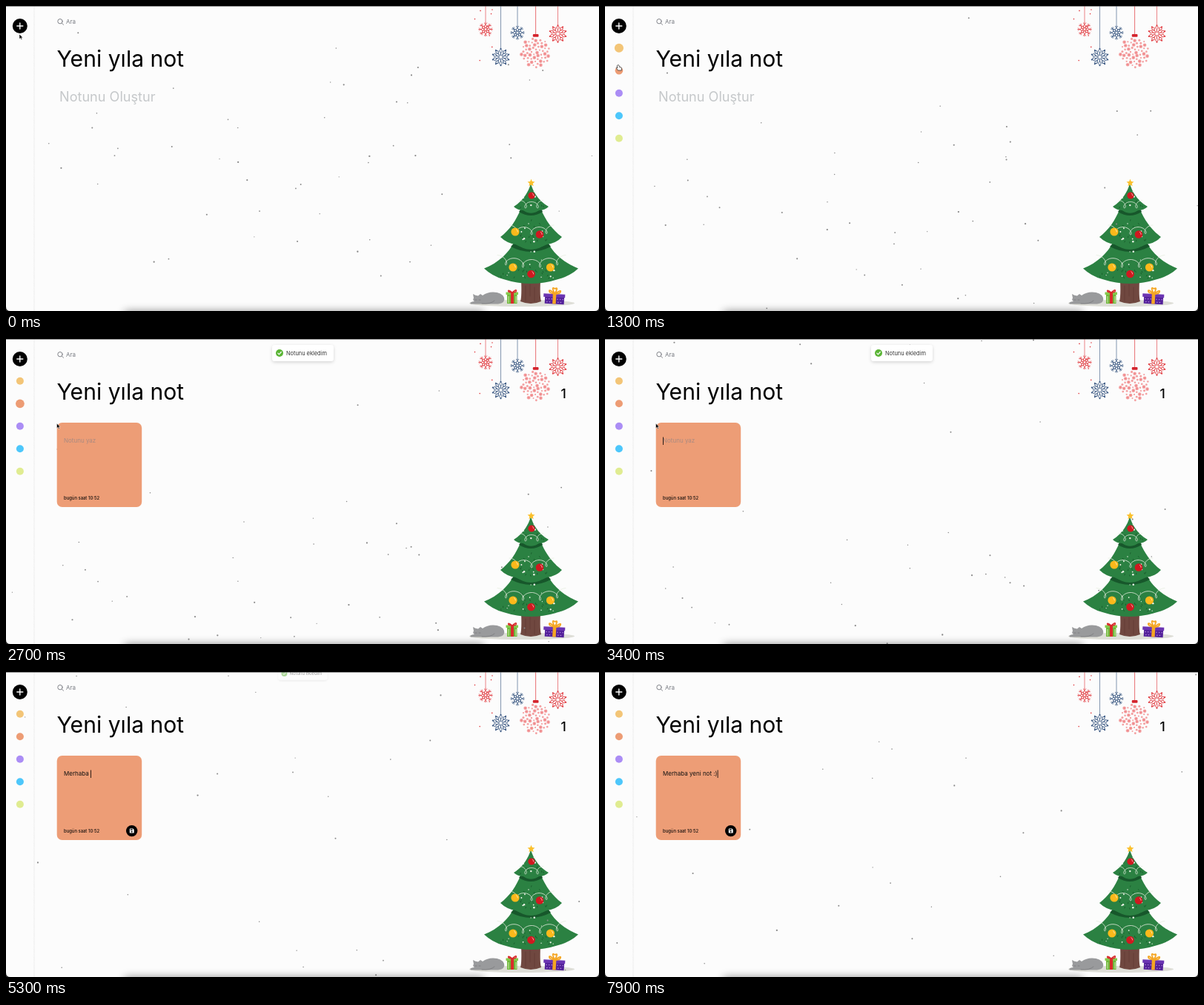
Recreate the animation shown at these times as an HTML page. Size 800 by 412 pixels, loop 8000 ms.

```html
<!DOCTYPE html>
<html lang="tr">
<head>
<meta charset="utf-8">
<title>Yeni yıla not</title>
<style>
html, body { margin: 0; width: 100%; height: 100%; overflow: hidden; background: #fcfcfc; }
svg { display: block; width: 100vw; height: 100vh; }
text { font-family: Inter, sans-serif; white-space: pre; }
.line { fill: none; stroke-linecap: round; stroke-linejoin: round; }
</style>
</head>
<body>
<svg viewBox="0 0 800 412" xmlns="http://www.w3.org/2000/svg">
  <defs>
    <filter id="soft" x="-20%" y="-200%" width="140%" height="500%"><feGaussianBlur stdDeviation="6"/></filter>
    <filter id="drop" x="-20%" y="-40%" width="140%" height="200%"><feDropShadow dx="0" dy="1.5" stdDeviation="2" flood-opacity=".16"/></filter>
  </defs>
  <rect width="800" height="412" fill="#fcfcfc"/>
  <path d="M38 0V412" stroke="#dedede" stroke-width=".7" stroke-dasharray="1.5 .7"/>
  <g id="decor"></g>

  <!-- tree -->
  <ellipse cx="696" cy="401.5" rx="71" ry="4.6" fill="#deded7"/>
  <path d="M695 370H721Q720 394 722 399Q708 405 694 399Q696 392 695 370Z" fill="#704840"/>
  <path class="line" d="M701 378V398M707 376V392M713 380V399" stroke="#603c36" stroke-width=".7"/>
  <g fill="#2b8142">
    <path d="M686 318C678 334 664 347 645 354.500Q656 365 671 369Q708 381 745 369Q761 365 772 354.500C753 347 738 334 730 318Z"/>
    <path d="M686 320Q708 338 731 320L735 325Q708 339 681 325Z" fill="#17572b"/>
    <path d="M695 273C688 290 680 302 667 312Q675 320 687 322Q708 333 730 322Q743 320 750 312C737 302 728 290 721 273Z"/>
    <path d="M695 274Q708 285 722 274L724 278Q708 288 692 278Z" fill="#17572b"/>
    <path d="M708 240C704 254 695 265 685 271Q690 276 698 276Q708 283 719 276Q727 276 732 271C721 265 712 254 708 240Z"/>
  </g>
  <g id="trim"></g>

  <!-- cat -->
  <g fill="#999a9c">
    <path d="M632 399Q624 400 627 402.500H664Q674 401 672 394Q669 386.500 657 386.500Q649 386.500 643 391L640 389L637 391.500Q633 391 630 389L631 394.500Q629 397 632 399Z"/>
    <path class="line" d="M642 402Q654 403 659 398M633 397H635M638 397H640" stroke="#747578" stroke-width=".7"/>
  </g>

  <!-- gifts -->
  <g>
    <rect x="676" y="388" width="13.500" height="14" fill="#6fb73b"/>
    <path d="M674.500 386.500H691V390H674.500Z" fill="#85c94d"/>
    <path d="M681 386.500H685V402H681Z" fill="#d82c2c"/>
    <path class="line" d="M683 387Q676 382 678 386Q680 387 683 387Q690 381 688 386Q686 387 683 387" stroke="#d82c2c" stroke-width="1.4"/>
    <path d="M678 392V401M688 392V401" stroke="#d9edb9" stroke-width=".9"/>
  </g>
  <g transform="rotate(3 740 396)">
    <rect x="727" y="392" width="26" height="10.500" fill="#54229a"/>
    <rect x="725" y="389" width="29" height="4.500" fill="#6b35b2"/>
    <path d="M737.500 389H742V402.500H737.500Z" fill="#f5a623"/>
    <path class="line" d="M740 389Q730 381 733 387Q736 389 740 389Q734 378 740 382Q745 378 740 389Q750 381 747 387Q744 389 740 389" stroke="#f5a623" stroke-width="1.800"/>
    <path class="line" d="M729 396H737M744 396H752M730 400H737M745 400H752" stroke="#b98de2" stroke-width="1.400" stroke-dasharray=".1 3.500"/>
  </g>

  <g id="snow" fill="#8a8a8a"></g>

  <!-- sidebar and header -->
  <g id="dots"></g>
  <circle cx="18.800" cy="27" r="10"/>
  <path class="line" d="M14.800 27H22.800M18.800 23V31" stroke="#fff" stroke-width="1.4"/>
  <g class="line" stroke="#74777d" stroke-width=".9"><circle cx="73" cy="20.700" r="3.200"/><path d="M75.400 23.100L77.600 25.300"/></g>
  <text x="81" y="24.200" font-size="8" fill="#777a80">Ara</text>
  <text x="68.500" y="82" font-size="30.100">Yeni yıla not</text>
  <text id="empty" x="72" y="128.600" font-size="18.100" fill="#c5c8ca">Notunu Oluştur</text>

  <g id="note">
    <text x="748.500" y="79.500" font-size="17.500" font-weight="500">1</text>
    <rect x="68.700" y="113" width="114.500" height="114" rx="7" fill="#ed9d76"/>
    <text id="hint" x="78" y="140.300" font-size="8" fill="#a98a80">Notunu yaz</text>
    <text id="typed" x="78" y="140.300" font-size="8" fill="#111"></text>
    <rect id="caret" y="132.500" width=".8" height="10.500"/>
    <text x="78" y="217" font-size="5.900" font-weight="500" fill="#17110e">bugün saat 10:52</text>
    <g id="save">
      <circle cx="169.700" cy="214.600" r="7.700"/>
      <path d="M166.800 212Q166.800 211.600 167.300 211.600H171.300L172.700 213V217Q172.700 217.600 172.200 217.600H167.300Q166.800 217.600 166.800 217Z" fill="#fff"/>
      <path d="M167.800 212.400H170.800V213.700H167.800Z"/><circle cx="169.700" cy="215.700" r="1"/>
    </g>
  </g>

  <g id="toast">
    <rect x="359" y="8" width="83" height="22" rx="4" fill="#fff" filter="url(#drop)"/>
    <circle cx="369" cy="19" r="5" fill="#5bb536"/>
    <path class="line" d="M366.800 19.200L368.400 20.800L371.300 17.500" stroke="#fff" stroke-width="1.200"/>
    <text x="378" y="21.600" font-size="7.400" fill="#363636">Notunu ekledim</text>
  </g>

  <!-- window edges -->
  <rect x="160" y="412" width="484" height="14" opacity=".42" filter="url(#soft)"/>
  <path d="M0 .3H800" stroke="#555" stroke-width=".8"/>
  <path d="M0 406Q0 412 6 412H0ZM800 406Q800 412 794 412H800Z" fill="#222"/>

  <path id="arrow" d="M0 0V6.600L1.600 5.200L2.700 7.600L3.800 7.100L2.700 4.800H4.700Z" stroke="#fff" stroke-width=".5"/>
  <path id="hand" d="M-1-4Q0-5 .8-4L1.500-1.500Q4-2 4.500 0L4.300 3H-.5L-3-.5Q-2.500-1.700-1-.3L-1.700-3Q-1.700-4-1-4Z" fill="#fff" stroke="#222" stroke-width=".7"/>
</svg>
<script>
const LOOP = 8000, ADDED = 2200;
const RED = "#e0353a", BLUE = "#32517d";

const $ = id => document.getElementById(id);
function el(parent, tag, attrs) {
  const node = document.createElementNS("http://www.w3.org/2000/svg", tag);
  for (const k in attrs) node.setAttribute(k, attrs[k]);
  return parent.appendChild(node);
}
const disc = (parent, cx, cy, r, fill) => el(parent, "circle", { cx, cy, r, fill });
const stroke = (parent, d, color, width) =>
  el(parent, "path", { d, class: "line", stroke: color, "stroke-width": width });
const show = (id, on) => $(id).setAttribute("display", on ? "inline" : "none");
const span = (t, a, b) => Math.min(1, Math.max(0, (t - a) / (b - a)));
const smooth = u => u * u * (3 - 2 * u);
const easeOut = u => 1 - (1 - u) ** 4;

let seed = 11;
const rand = (a = 0, b = 1) => a + (b - a) * (seed = seed * 16807 % 2147483647) / 2147483647;

// Hanging ornaments
const decor = $("decor");

function flake(x, y, r, color, arms, round) {
  stroke(decor, `M${x} 0V${y - r}`, color, 0.6);
  for (let i = 0; i < arms; i++) {
    const g = el(decor, "g", { transform: `translate(${x} ${y}) rotate(${i * 360 / arms}) scale(${r / 10})` });
    if (round) {
      stroke(g, "M0-2V-5Q3-7.500 0-9Q-3-7.500 0-5", color, 0.8);
      disc(g, 0, -9.600, 0.9, color);
    } else {
      stroke(g, "M0-9.500V-5.500M-1.800-8.800L0-7L1.800-8.800M0-6L1.900-4L0-1.500L-1.900-4Z", color, 0.8);
    }
  }
}
flake(647, 31.500, 9.800, RED, 8);
flake(690, 36, 9.800, BLUE, 8);
flake(667.500, 69, 11.700, BLUE, 10, true);
flake(744.500, 37.500, 11.700, RED, 10, true);

stroke(decor, "M714.600 0V38", RED, 0.7);
for (let i = 0; i < 55; i++) {
  const r = 20 * Math.sqrt((i + .5) / 55), a = i * 2.39996;
  const x = 714.600 + r * Math.cos(a), y = 63 + r * Math.sin(a), big = i % 3 == 0;
  disc(decor, x, y, big ? 2.300 : rand(1, 1.700), "#f4a0a1");
  if (big) disc(decor, x, y, 0.8, "#ea777b");
}
el(decor, "rect", { x: 710.800, y: 38, width: 7.700, height: 3.800, rx: 1, fill: "#d4242d" });
for (let i = 0; i < 8; i++) disc(decor, rand(632, 657), 5 + i * i * 1.400, 0.8, RED);

// Tree trimmings
const trim = $("trim");

function speckle(top, bottom, half, count) {
  for (let i = 0; i < count; i++) {
    const u = Math.sqrt(rand()), x = 708 + rand(-1, 1) * (half * u * .8 + 3), y = top + (bottom - top) * u;
    if (i % 3) stroke(trim, `M${x} ${y}l${rand(-1, 1)} 1.500`, "#185b2c", 0.9);
    else disc(trim, x, y, rand(0.6, 1.300), "#f3f6ec");
  }
}
speckle(246, 274, 20, 12);
speckle(282, 319, 36, 27);
speckle(328, 368, 54, 42);

function garland(half, y, sag, loops, a) {
  let d = "";
  for (let i = 0; i <= 120; i++) {
    const u = i / 120, p = u * loops * Math.PI * 2;
    const x = 709 + half * (2 * u - 1) + a * Math.sin(p);
    d += (i ? "L" : "M") + x + " " + (y + sag * Math.sin(Math.PI * u) - a * Math.cos(p));
  }
  stroke(trim, d, "#e6eee0", 0.8);
}
garland(16, 267, 2, 2, 4.500);
garland(30, 301, 3, 3, 5);
garland(46, 342, 6, 4, 5.500);

function bauble(x, y, r, color) {
  disc(trim, x, y, r, color);
  stroke(trim, `M${x + r * .25} ${y - r * .6}Q${x + r * .65} ${y - r * .4} ${x + r * .6} ${y}`, "#fff9", 1);
}
bauble(709, 256, 4.600, "#d01920");
bauble(720, 308.500, 5.300, "#d01920");
bauble(708.500, 362, 5.300, "#d01920");
bauble(687, 305, 5.600, "#fbb91b");
bauble(684, 353, 5.600, "#fbb91b");
bauble(734.500, 353, 5.600, "#fbb91b");

let star = "";
for (let i = 0; i < 10; i++) {
  const r = i % 2 ? 2.400 : 5.200, a = i * Math.PI / 5;
  star += `${708.500 + r * Math.sin(a)},${239 - r * Math.cos(a)} `;
}
el(trim, "polygon", { points: star, fill: "#fbc02c" });

// Snow: only every other flake comes back, so the fall thins out
const flakes = Array.from({ length: 50 }, (_, i) => {
  const size = rand();
  return {
    x: rand(0, 800), y: rand(0, 200) + rand(0, 200),
    vx: rand(-12, 12), vy: rand(28, 58) + 18 * size,
    again: i % 2 == 0,
    node: disc($("snow"), 0, 0, 0.6 + size * .6, "inherit")
  };
});

function drawSnow(s) {
  for (const f of flakes) {
    const y = f.y + f.vy * s;
    f.node.setAttribute("cx", (f.x + f.vx * s + 800) % 800);
    f.node.setAttribute("cy", f.again ? y % 416 : y);
  }
}

// Colour picker
const dots = ["#f3c577", "#ed9c74", "#ab8df5", "#4dc7fb", "#e0ec91"]
  .map((color, i) => ({ y: 56.800 + i * 30.500, node: disc($("dots"), 18.900, 0, 5, color) }));

function drawDots(t) {
  dots.forEach(({ y, node }, i) => {
    const u = smooth(span(t, 400 + i * 60, 700 + i * 60));
    let hover = 0;
    if (i == 0) hover = span(t, 950, 1100) - span(t, 1270, 1400);
    if (i == 1) hover = span(t, 1270, 1420) - span(t, 2640, 2800);
    node.setAttribute("cy", 27 + (y - 27) * u);
    node.setAttribute("r", 5 + 1.400 * hover);
    node.setAttribute("opacity", u);
  });
}

function drawPointer(t) {
  const down = smooth(span(t, 700, 1250)), across = smooth(span(t, 2300, 2700));
  const place = `translate(${18 + 50.500 * across} ${38 + 46 * down + 30 * across})`;
  const pressable = t > 950 && t < 2400;
  for (const id of ["arrow", "hand"]) $(id).setAttribute("transform", place);
  show("hand", pressable);
  show("arrow", !pressable && t < 3570);
}

function drawToast(t) {
  const a = easeOut(span(t, ADDED, ADDED + 350)), b = easeOut(span(t, 5235, 5635));
  const shift = -44 * (1 - a) - 33 * b;
  const scale = 0.6 + .4 * a - .4 * b;
  show("toast", t >= ADDED && b < 1);
  $("toast").setAttribute("opacity", (0.5 + .5 * a) * (1 - b));
  $("toast").setAttribute("transform", `translate(400.500 ${19 + shift}) scale(${scale}) translate(-400.500 -19)`);
}

function drawNote(t) {
  // Typing picks up speed
  const count = Math.floor(3.500 * Math.max(0, t / 1000 - 3.200) ** 1.270);
  const noted = t >= ADDED;
  show("note", noted);
  show("empty", !noted);
  if (!noted) return;
  $("typed").textContent = "Merhaba yeni not :)".slice(0, count);
  show("hint", !count);
  show("save", count);
  show("caret", t > 3100);
  $("caret").setAttribute("x", 78.200 + (count ? $("typed").getComputedTextLength() : 0));
}

function frame(now) {
  const t = now % LOOP;
  drawSnow(t / 1000);
  drawDots(t);
  drawPointer(t);
  drawToast(t);
  drawNote(t);
  requestAnimationFrame(frame);
}
frame(0);
</script>
</body>
</html>
```
